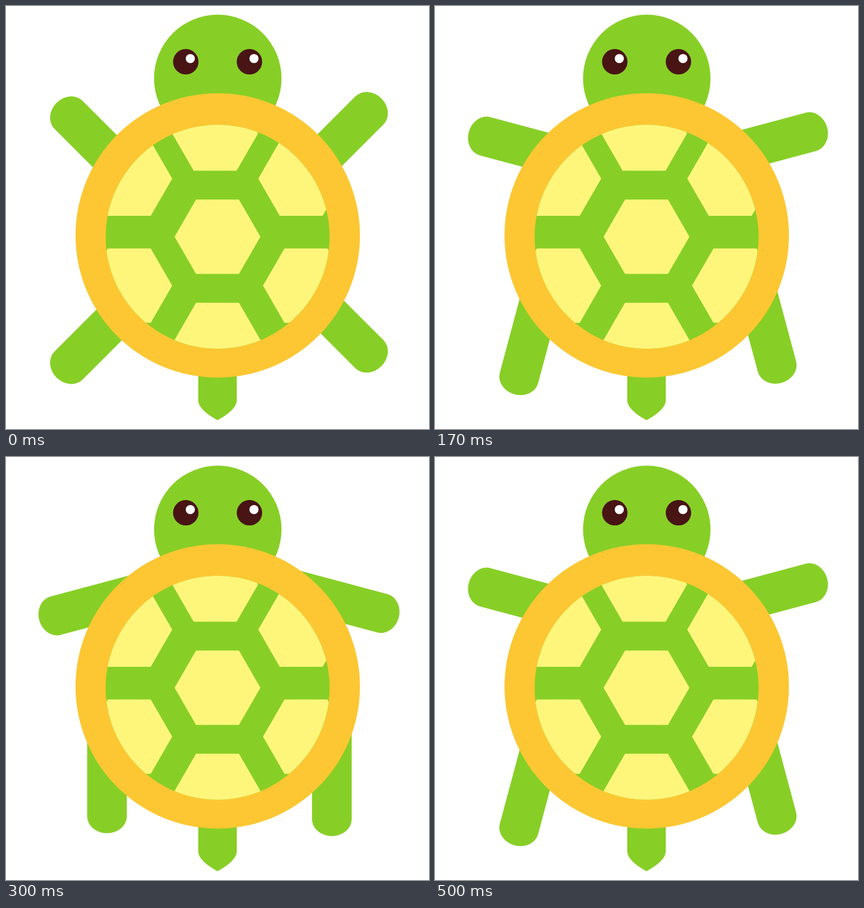
An HTML page with a canvas that plays this animation: 748 px wide and 748 px high, repeating every 0.63 s.

```html
<!DOCTYPE html>
<html lang="en">
<head>
<meta charset="utf-8">
<title>Turtle</title>
<style>
  html, body { margin: 0; width: 100%; height: 100%; overflow: hidden; background: #fff; }
  canvas { display: block; width: 748px; height: 748px; }
</style>
</head>
<body>
<canvas id="stage" width="748" height="748"></canvas>
<script>
const ctx = document.getElementById('stage').getContext('2d');
const GREEN = '#87cf26', ORANGE = '#fcc732', YELLOW = '#fef67b', BROWN = '#481414';
const LOOP = 630;
const ARM = 84.6, HALF_WIDTH = 35.1, TIP = 30;
const HEX = 75.9;

// Limbs turn about a shoulder; slip is how far it slides at the end of the stroke.
const LIMBS = [
  { side: -1, y: 252.3, slip: [-1, 6.5] },
  { side: 1, y: 244.5, slip: [1, 10] },
  { side: -1, y: 576, slip: [8.2, -25.3], hind: true },
  { side: 1, y: 555.8, slip: [-6.6, 0], hind: true }
];

const PLATES = [
  [374, 408], [369.8, 225.4], [374, 590.6],
  [218, 305.2], [522, 305.2], [218, 494.6], [530.4, 494.6]
];

function disc(x, y, r, color) {
  ctx.fillStyle = color;
  ctx.beginPath();
  ctx.arc(x, y, r, 0, Math.PI * 2);
  ctx.fill();
}

// stroke: 0 = limbs spread, 1 = half way, 2 = pulled back
function limb({ side, y, slip, hind }, stroke) {
  const deg = hind ? Math.min(45 + 30 * stroke, 90) : 30 * stroke - 45;
  const [dx, dy] = stroke === 2 ? slip : [0, 0];
  ctx.save();
  ctx.translate(376.6 + side * 206.2 + dx, y + dy);
  ctx.scale(side, 1);
  ctx.rotate(deg * Math.PI / 180);
  ctx.beginPath();
  ctx.ellipse(ARM, 0, TIP, HALF_WIDTH, 0, -Math.PI / 2, Math.PI / 2);
  ctx.lineTo(-ARM, HALF_WIDTH);
  ctx.lineTo(-ARM, -HALF_WIDTH);
  ctx.fill();
  ctx.restore();
}

function tail() {
  ctx.beginPath();
  ctx.moveTo(340, 640);
  ctx.lineTo(340, 699);
  ctx.quadraticCurveTo(342, 715, 374, 732.4);
  ctx.quadraticCurveTo(406, 715, 408, 699);
  ctx.lineTo(408, 640);
  ctx.fill();
}

function head() {
  disc(374.5, 128, 112.7, GREEN);
  for (const x of [317.9, 430.5]) {
    disc(x, 98.6, 22.5, BROWN);
    disc(x + 8, 93, 8.1, '#fff');
  }
}

function plate([x, y]) {
  ctx.beginPath();
  for (let i = 0; i < 6; i++) {
    const a = i * Math.PI / 3;
    ctx.lineTo(x + HEX * Math.cos(a), y + HEX * Math.sin(a));
  }
  ctx.fill();
}

function shell() {
  disc(374.4, 405.7, 251.5, ORANGE);
  disc(374.2, 408, 198, GREEN);
  ctx.save();
  ctx.clip();
  ctx.fillStyle = YELLOW;
  PLATES.forEach(plate);
  ctx.restore();
}

function strokeAt(t) {
  if (t < 170) return 0;
  return t >= 300 && t < 500 ? 2 : 1;
}

function draw(t) {
  const stroke = strokeAt(t);
  ctx.fillStyle = '#fff';
  ctx.fillRect(0, 0, 748, 748);
  ctx.fillStyle = GREEN;
  LIMBS.forEach(l => limb(l, stroke));
  tail();
  head();
  shell();
}

const start = performance.now();
function tick() {
  draw((performance.now() - start) % LOOP);
  requestAnimationFrame(tick);
}
tick();
</script>
</body>
</html>
```
